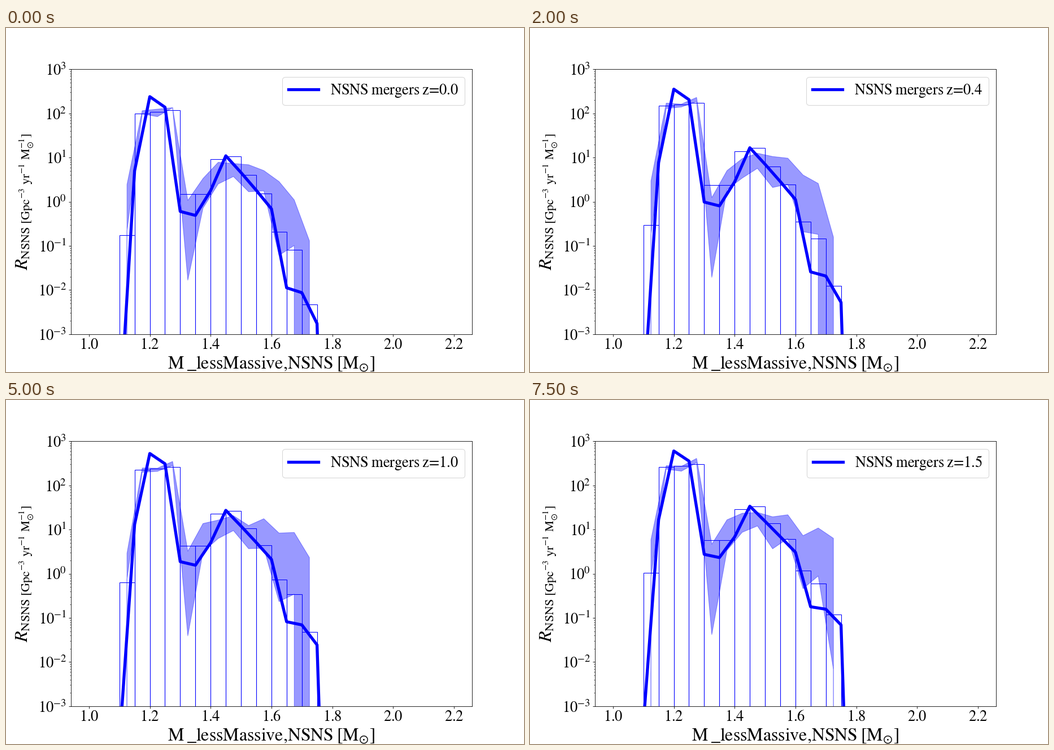
A matplotlib script for the animation above (8000 ms loop, 917 by 611 pixels).

```python
import matplotlib.pyplot as plt
import numpy as np
from matplotlib.animation import FuncAnimation

W, H, DPI = 917, 611, 64
S = W / 12 / DPI            # point scale of a 12 inch wide page
FRAMES, STEP_MS = 16, 500
Z_MAX = 1.5

plt.rcParams.update({
    "font.family": "Liberation Serif",
    "mathtext.fontset": "stix",
    "font.size": 25 * S,
    "axes.labelsize": 30 * S,
    "axes.linewidth": 0.8 * S,
    "axes.labelpad": 4 * S,
    "patch.linewidth": 1.0 * S,
})
for axis in ("xtick", "ytick"):
    plt.rcParams.update({
        f"{axis}.major.size": 3.5 * S, f"{axis}.major.width": 0.8 * S,
        f"{axis}.major.pad": 3.5 * S, f"{axis}.minor.size": 2 * S,
        f"{axis}.minor.width": 0.6 * S, f"{axis}.minor.pad": 3.4 * S,
    })

# log10 merger rates at z = 0: two peaks over mass, per bin and per bin edge
BINS = np.array([-.76, 2.0, 2.03, 2.07, .17, .17, .96, 1.03, .61, .19, -.68, -1.09, -2.33])
NODES = np.array([-5, .7, 2.38, 2.14, -.22, -.31, .25, 1.04, .66, .26, -.16, -1.95, -2.06, -2.76])

# Band limits relative to the bins, in dex
ABOVE = np.array([.85, .06, .02, .1, -.18, .4, -.13, -.1, .13, .5, .88, 1.15, 1.5])
BELOW = np.array([-.1, -.06, -.09, .04, -2.1, -.2, -.58, -.5, -.5, 0, -.3, .1, -1.6])
NOISE = np.random.default_rng(4).uniform(-1, 1, (FRAMES, 2, len(BINS)))

EDGES = 1.1 + 0.05 * np.arange(15)
BAND_X = 1.075 + 0.05 * np.arange(15)


def evolve(rate, z):
    """Rare systems grow most; common ones level off earlier."""
    rise = np.minimum(0.32 + 0.3 * 10 ** (-0.24 * rate), 1.6)
    power = np.clip(1.3 + 0.2 * rate, 1.15, 2)
    return rate + rise * (1 - (1 - z / Z_MAX) ** power)


def bars_at(z):
    return 10 ** evolve(BINS, z)


def curve_at(z):
    y = evolve(NODES, z)
    return 10 ** np.append(y, y[-1] - 10.5)


def band_at(i, z):
    rate = evolve(BINS, z)
    spread = np.minimum(0.2 * 10 ** (-0.3 * rate), 0.4)
    high = rate + ABOVE + spread * NOISE[i, 0]
    low = np.minimum(rate + BELOW + spread * NOISE[i, 1], high)
    low, high = np.pad(10 ** low, 1), np.pad(10 ** high, 1)
    if NOISE[i, 1, -1] < 0.3:       # last bin often has no lower limit
        low[-2] = 0
    return np.column_stack([np.concatenate([BAND_X, BAND_X[::-1]]),
                            np.concatenate([low, high[::-1]])])


def roman(text):
    """Upright math text with ordinary word spacing."""
    for old, new in ((" ", r"\hspace{0.25}"), (",", "{,}"),
                     ("=", r"\hspace{-0.2}=\hspace{-0.2}")):
        text = text.replace(old, new)
    return rf"$\mathrm{{{text}}}$"


def label(z):
    return roman(f"NSNS mergers z={z:.1f}")


fig, ax = plt.subplots(figsize=(W / DPI, H / DPI), dpi=DPI)
fig.subplots_adjust(left=0.125, right=0.8998, bottom=0.11, top=0.88)
ax.set_yscale("log")

bars = ax.bar(EDGES[:13], bars_at(0), width=0.05, align="edge",
              fill=False, edgecolor="blue", linewidth=S)
band, = ax.fill(*band_at(0, 0).T, color="blue", alpha=0.4, joinstyle="round")
curve, = ax.plot(EDGES, curve_at(0), color="blue", lw=5 * S, label=label(0))

ax.set_xlim(0.94, 2.26)
ax.set_ylim(1e-3, 1e3)
ax.set_xticks(np.arange(1.0, 2.3, 0.2))
ax.xaxis.set_major_formatter(lambda v, _: roman(f"{v:.1f}"))
ax.yaxis.set_major_formatter(lambda v, _: roman(f"10^{{{round(np.log10(v))}}}"))
ax.set_xlabel(roman(r"M \_lessMassive,NSNS [M_{\odot}]"))
ax.set_ylabel(r"$R_{\mathrm{NSNS\ [Gpc^{-3}\ yr^{-1}\ M_{\odot}^{-1}]}}$")
legend = ax.legend(loc="upper right")


def update(i):
    z = i / 10
    for bar, h in zip(bars, bars_at(z)):
        bar.set_height(h)
    band.set_xy(band_at(i, z))
    curve.set_ydata(curve_at(z))
    legend.get_texts()[0].set_text(label(z))
    return [*bars, band, curve, legend]


anim = FuncAnimation(fig, update, frames=FRAMES, interval=STEP_MS,
                     repeat=True, repeat_delay=0)
plt.show()
```
